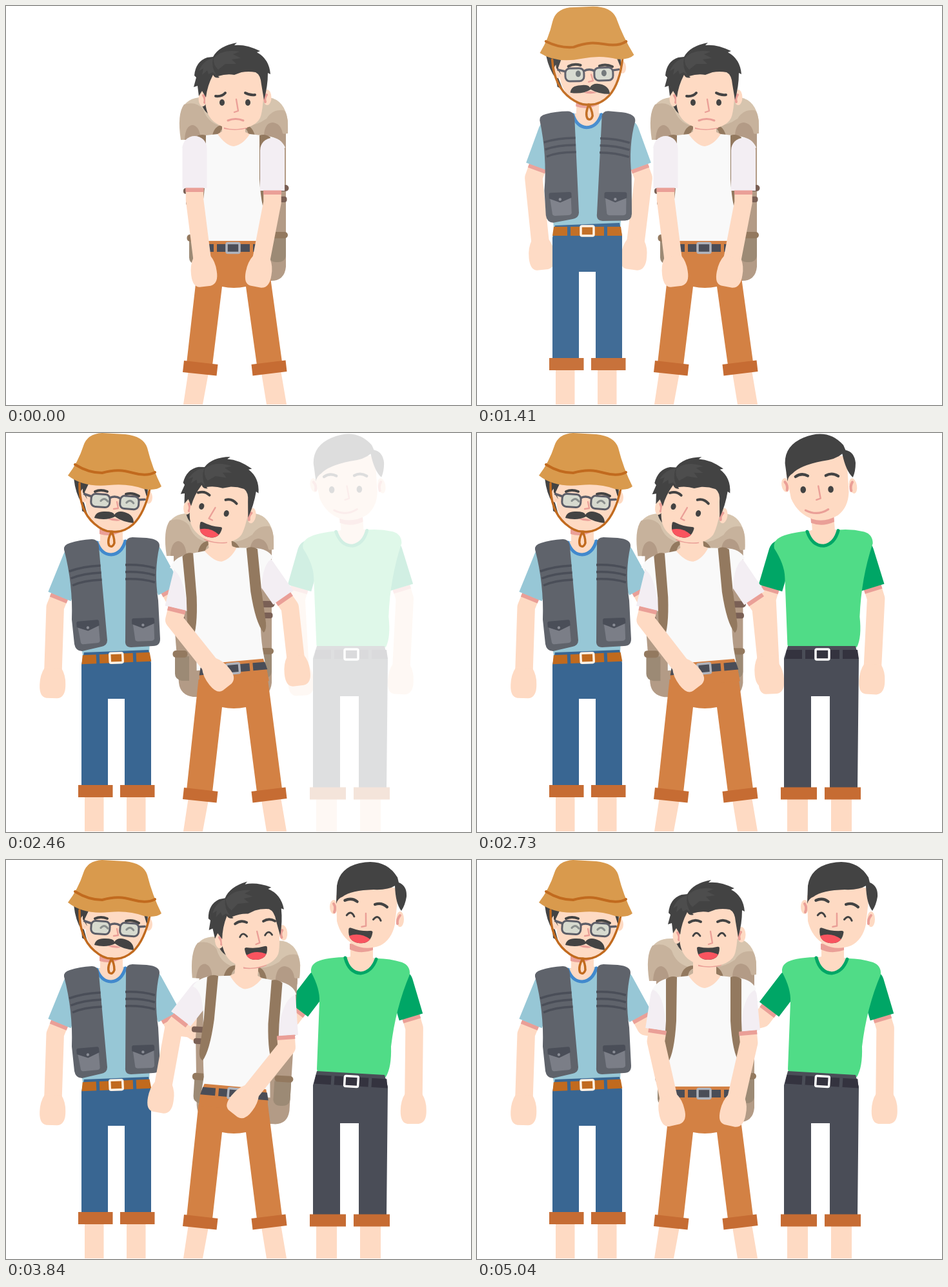
An HTML page with a canvas for the animation above (6 s loop, 721 by 620 pixels).

```html
<!DOCTYPE html>
<html lang="en">
<head>
<meta charset="utf-8">
<title>Three friends</title>
<style>
html, body { margin: 0; width: 100%; height: 100%; overflow: hidden; background: #fff; }
canvas { position: absolute; left: 0; top: 0; }
</style>
</head>
<body>
<canvas id="dad" width="721" height="620"></canvas>
<canvas id="friend" width="721" height="620"></canvas>
<canvas id="boy" width="721" height="620"></canvas>
<script>
const LOOP = 6000, STEP = 30;
const SKIN = '#fedac3', PINK = '#ea9f97', DARK = '#434343', CUFF = '#c66c33';
const layers = ['dad', 'friend', 'boy'].map(id => document.getElementById(id));
let g;

// Drawing helpers
const shape = (color, d) => { g.fillStyle = color; g.fill(new Path2D(d)); };
const line = (color, width, d) => {
  g.strokeStyle = color; g.lineWidth = width;
  g.stroke(new Path2D(d));
};
const box = (color, x, y, w, h, r = 0) => {
  g.fillStyle = color; g.beginPath(); g.roundRect(x, y, w, h, r); g.fill();
};
const frame = (color, width, x, y, w, h, r, inside) => {
  box(inside, x, y, w, h, r);
  g.strokeStyle = color; g.lineWidth = width; g.stroke();
};
const oval = (color, x, y, rx, ry) => {
  g.fillStyle = color; g.beginPath(); g.ellipse(x, y, rx, ry, 0, 0, 7); g.fill();
};
const within = (x, y, deg, paint) => {
  g.save(); g.translate(x, y); g.rotate(deg * Math.PI / 180); paint(); g.restore();
};
const turn = (px, py, deg, dx, dy, paint) =>
  within(px + dx, py + dy, deg, () => { g.translate(-px, -py); paint(); });

// Motion helpers
const clamp = k => Math.min(1, Math.max(0, k));
const ease = (t, from, to) => { const k = clamp((t - from) / (to - from)); return k * k * (3 - 2 * k); };
const mix = (a, b, k) => a.map((v, i) => v + (b[i] - v) * k);
const fadeIn = (t, start) => t < start ? 0 : clamp((t - start + 48) / 270);

// An arm is [shoulder x, y, sleeve hem x, y, wrist x, y]
const angle = (dx, dy) => -Math.atan2(dx, dy) * 180 / Math.PI;

function sleeve([sx, sy, ex, ey], color) {
  const dx = ex - sx, dy = ey - sy;
  within(sx, sy, angle(dx, dy), () =>
    shape(color, `M-19,0A19,19 0 0 1 19,0V${Math.hypot(dx, dy)}H-19Z`));
}

function forearm([sx, sy, ex, ey, wx, wy]) {
  const dx = ex - sx, dy = ey - sy, bend = 18 / Math.hypot(dx, dy);
  const kx = ex + dx * bend, ky = ey + dy * bend;
  g.lineCap = 'butt';
  line(SKIN, 27.5, `M${ex},${ey}L${kx},${ky}L${wx},${wy}`);
  g.lineCap = 'round';
  within(wx, wy, angle(wx - kx, wy - ky), () =>
    shape(SKIN, 'M-13,-3H13Q20,8 20,22Q21,42 8,44H-9Q-20,43 -20,24Q-20,8 -13,-3Z'));
  within(ex, ey, angle(dx, dy), () => box(PINK, -14, -.5, 28, 6.5));
}

// Face parts around the point between the eyes
function features(x, y, deg, mood, size = 1) {
  within(x, y, deg, () => {
    g.scale(size, size);
    const brows = mood === 'sad'
      ? 'M-30,-10Q-20,-9 -15,-15M16,-15Q23,-11 31,-12'
      : 'M-31,-19Q-22,-25 -13,-20M13,-20Q22,-25 31,-19';
    line(DARK, 4, brows);
    if (mood === 'laugh') {
      line(DARK, 2.8, 'M-25,2Q-20,-7 -14,2M14,2Q20,-7 25,2');
    } else {
      oval(DARK, -20, 0, 4, 5);
      oval(DARK, 20, 0, 4, 5);
    }
    line(PINK, 2.3, mood === 'cheer' ? 'M1,-4L-4,15L2,16' : 'M2,-5L5,13L-1,15');
    if (mood === 'sad') return line(PINK, 3, 'M-11,28Q1,23 13,28');
    if (mood === 'smile') return line(PINK, 3, 'M-17,30Q0,39 16,29');
    if (mood === 'cheer') g.translate(4, 4);
    shape(DARK, 'M-19,21Q-19,19 -16,19Q-1,22 12,19Q16,18 16,21Q16,39 -2,39Q-18,39 -19,21Z');
    shape('#f9545f', 'M-17,31Q-2,23 14,31Q10,39 -2,39Q-13,39 -17,31Z');
  });
}

function pocket(x, y, deg) {
  within(x, y, deg, () => {
    shape('#7b7e87', 'M1,4H34L34,33Q33,36 29,36H8Q4,36 4,32Z');
    shape('#4a4e58', 'M0,3Q0,0 3,0H32Q35,0 35,3V9L17,16L0,9Z');
    oval('#8a8d96', 17, 11, 2.2, 2.2);
  });
}

function legs(x1, x2, y, width) {
  for (const x of [x1, x2]) {
    box(SKIN, x + 10, y + 15, width - 24, 620 - y);
    box(CUFF, x, y, width, 19);
  }
}

const dadArms = {
  left: [[114, 195, 94, 250, 98, 366], [107, 195, 83, 254, 73, 368]],
  right: [[232, 195, 252, 250, 246, 366], [224, 190, 253, 243, 285, 262]]
};

function drawDad(t) {
  const k = ease(t, 1440, 1770);
  const blue = '#97c7d6', pants = '#396692', brown = '#c16a1e', vest = '#5f636b';
  for (const side of [dadArms.left, dadArms.right]) {
    const arm = mix(...side, k);
    forearm(arm);
    sleeve(arm, blue);
  }
  turn(172, 345, 2.5 * (1 - k), 0, 0, () => {
    shape(blue, 'M120,172L145,168L185,166L228,172L222,345L119,348L108,240Z');
    shape(SKIN, 'M146,140H181V166L184,168Q178,188 163,188Q148,188 141,170L146,168Z');
    shape(PINK, 'M145,149H181V152Q164,163 145,157Z');
    line('#4189cd', 5, 'M141,170Q148,189 163,189Q179,188 185,168');
  });
  shape(pants, 'M121,341L117,360V548H158V413H184V548H225V357L221,337Z');
  legs(112, 177, 547, 53.5);
  turn(171, 350, 2.5 * (1 - k) - 2.5, 0, 0, () => {
    shape(brown, 'M119,343H223L225,357H117Z');
    box(pants, 140, 342, 5, 16);
    box(pants, 197, 342, 5, 16);
    frame('#fff3e6', 3.5, 161, 342, 20, 15, 2, brown);
  });
  turn(172, 345, 2.5 * (1 - k), 0, 0, () => {
    shape(vest, 'M90,181Q89,174 99,171Q114,166 133,165Q143,165 144,177L157,322Q157,330 148,332L118,339Q108,339 106,328L102,290Q104,235 90,181Z');
    shape(vest, 'M186,172Q186,162 196,162L218,163Q239,165 238,176Q229,215 236,260L239,320Q239,331 228,331L194,333Q184,333 185,322Z');
    g.lineCap = 'butt';
    for (const [i, y] of [0, 11, 22].entries()) {
      line('#4a4e58', 3.5, `M${98 + i * 2.5},${215 + y}Q120,${207 + y} ${146.5 + i},${206 + y}`);
      line('#4a4e58', 3.5, `M185,${205 + y}Q210,${204 + y} 231,${210 + y}`);
    }
    g.lineCap = 'round';
    pocket(109, 293, -5);
    pocket(195, 288, -2);
  });
  turn(168, 75, -5.5 * (1 - k), 2 * (1 - k), 0, () => drawDadHead(t < 1590));
}

function drawDadHead(awake) {
  const brown = '#c16a1e', frameColor = '#5c5d67';
  shape(DARK, 'M105,70L122,76L120,105L126,126L118,121L117,108Q108,95 105,70Z');
  oval(SKIN, 221, 100, 6, 10);
  oval(SKIN, 121, 97, 6, 11);
  line(PINK, 3, 'M122,91Q126,98 124,104');
  shape(SKIN, 'M120,72L124,115Q132,149 166,153Q203,151 213,118L219,82Z');
  shape(DARK, 'M119,75L129,77L122,92L126,103L119,92ZM213,82L220,85L219,102Z');
  line(DARK, 4, 'M138,91Q147,87 157,91M186,95Q196,92 206,98');
  within(168, 105, 4, () => {
    frame(frameColor, 3, -36, -8.5, 29, 20, 7, '#d7dacf');
    frame(frameColor, 3, 9, -8.5, 29, 20, 7, '#d7dacf');
    line(frameColor, 3.5, 'M-7,-4Q1,-8 9,-4M-36,-4L-47,-7M38,-4L47,-5');
    if (awake) {
      oval('#6e7577', -16, 0, 4, 5);
      oval('#6e7577', 24, 0, 4, 5);
    } else {
      line('#8b908e', 3, 'M-21,2Q-16,-5 -10,2M19,2Q24,-5 30,2');
    }
  });
  line(PINK, 2.3, 'M172,107L174,117L167,118');
  shape(PINK, 'M158,134Q168,130 178,136Q168,138 158,134Z');
  shape(DARK, 'M137,132Q139,121 154,122Q167,122 168,127Q173,120 184,123Q198,127 198,140Q180,138 169,130Q155,137 137,132Z');
  line(brown, 3.5, 'M114,78Q113,120 137,141Q152,154 164,153Q181,156 197,142Q215,125 223,86M164,153Q156,167 160,175Q165,179 168,171Q168,160 163,153');
  shape('#d99a4d', 'M96,66Q112,45 120,20Q126,1 149,0L185,2Q213,5 219,23Q227,55 241,83Q233,90 214,87Q190,78 160,81Q120,85 96,66Z');
  line(brown, 4, 'M107,49Q128,62 149,62C170,56 182,58 197,62Q218,68 231,61');
}

const friendArms = {
  left: [[471, 185, 455, 241, 456, 364], [485, 190, 453, 232, 412, 254]],
  right: [[596, 185, 613, 240, 613, 362], [612, 190, 628, 244, 632, 366]]
};

function drawFriend(t) {
  const k = ease(t, 2700, 3030);
  const green = '#50dc87', deep = '#00a666', pants = '#4a4d57', belt = '#34333f';
  for (const side of [friendArms.left, friendArms.right]) {
    const arm = mix(...side, k);
    forearm(arm);
    sleeve(arm, deep);
  }
  turn(535, 335, -4.5 * (1 - k), 0, 0, () => {
    shape(green, 'M524,151Q490,152 479,160Q472,165 473,174Q487,200 486,220L482,325L484,334L589,337Q598,322 597,290Q604,230 626,178Q627,164 614,159Q595,153 576,153Z');
    shape(SKIN, 'M534,120H569V152L574,154Q566,175 550,176Q533,175 527,152L534,150Z');
    shape(PINK, 'M533,130L569,133V140Q550,147 533,139Z');
    line(deep, 5, 'M526,152Q532,175 550,176Q567,174 574,154');
  });
  shape(pants, `M482,${331 - 3 * k}L476,350V551H518V409H547V551H590L592,352L587,${331 + 3 * k}Z`);
  legs(471, 539, 550.5, 56);
  within(535, 344, 3.5 * k, () => {
    shape(belt, 'M-55,-7H55L57,7H-57Z');
    box(pants, -31, -8, 5, 16);
    box(pants, 27, -8, 5, 16);
    frame('#fff', 3.5, -10, -8, 21, 16, 2, belt);
  });
  turn(554, 85, -10 * (1 - k), -29 * (1 - k), 0, () => {
    oval(SKIN, 508, 73, 6, 11);
    oval(SKIN, 611, 92, 6, 12);
    line(PINK, 4, 'M508,68Q512,74 509,81M611,86Q606,92 607,99');
    shape(SKIN, 'M512,55L513,95Q519,120 540,132Q558,141 580,133Q598,124 603,100L609,45L570,35Z');
    shape(DARK, 'M512,68L513,40Q517,12 548,5Q588,-4 607,27L609,35Q622,40 621,57Q619,70 613,79Q604,68 603,40Q592,47 570,46Q535,47 522,57Q514,60 512,68Z');
    features(555, 88, 9, t < 2850 ? 'smile' : 'laugh', 1.07);
  });
}

// Each body part is [x, y, tilt]; pack, torso and hip are offsets
const sad = {
  pack: [0, 0, 0], torso: [0, 19, 0], hip: [0, 13, 0], head: [355, 190, 0], face: [355, 150, 0],
  left: [292.5, 221, 292.5, 283, 304, 392], right: [413, 224, 413, 287, 396, 393]
};
const glance = {
  pack: [0, 0, 0], torso: [0, 18, -1], hip: [0, 12, -1.5], head: [350, 189, 10], face: [347.5, 135, 11],
  left: [283, 224, 271, 283, 252, 394], right: [408, 222, 419, 282, 415, 388]
};
const cheer = {
  pack: [-22, -17, 0], torso: [-3, 0, -5.5], hip: [0, 3, -5], head: [324, 168, 9], face: [322.5, 119.5, 16],
  left: [280, 212, 265, 273, 316, 360], right: [398, 210, 430, 256, 449, 349]
};
const smile = {
  pack: [-15, -15, 0], torso: [0, 4, -2.2], hip: [1, 3, -1.5], head: [342, 172, 5], face: [343.5, 122, 8.7],
  left: [284, 214, 271, 272, 303, 367], right: [408, 210, 431, 266, 435, 361]
};
const laugh = {
  pack: [12, -20, 3.5], torso: [5, 1, 4.5], hip: [2.5, 0, 5], head: [385, 166, -6], face: [387.5, 116, -4],
  left: [303, 206, 271, 247, 244, 349], right: [430, 212, 434, 273, 380, 360]
};
const rest = {
  pack: [-4, -20, 0], torso: [0, 0, 0], hip: [0, 0, 0], head: [360, 164, 0], face: [360, 116, 0],
  left: [288, 212, 280, 264, 297, 369], right: [415, 212, 420, 266, 402, 370]
};
const poses = [
  [0, sad], [1440, sad], [1800, glance], [1950, glance], [2430, cheer], [2670, cheer],
  [3060, smile], [3150, smile], [3690, laugh], [4800, laugh], [5040, rest], [LOOP, rest]
];

function boyPose(t) {
  const next = poses.findIndex(([time]) => time > t);
  const [from, a] = poses[next - 1], [to, b] = poses[next];
  const k = ease(t, from, to), pose = {};
  for (const part in a) pose[part] = mix(a[part], b[part], k);
  return pose;
}

const boyMood = t => t < 2130 ? 'sad' : t < 2790 ? 'cheer' : t < 3360 ? 'smile' : 'laugh';

function drawPack() {
  const strap = '#93795f', roll = '#7a6055', side = '#9c8a75', mid = '#c7b29c', main = '#b39b86';
  shape(main, 'M282,185H434V405Q432,427 411,427H312Q292,424 290,405L282,300Z');
  shape('#d6c4ae', 'M272,162Q280,142 304,142H408Q432,146 437,178V195H300Z');
  shape(mid, 'M271,208Q265,168 276,153Q295,147 306,161Q312,180 331,186V207Z');
  shape(mid, 'M437,198Q438,168 431,162Q413,160 404,175Q388,186 374,186V207Z');
  shape(main, 'M277,208Q278,185 290,185Q301,188 302,208ZM400,208Q399,182 413,181Q426,182 429,198L434,200V208Z');
  shape(side, 'M284,364H306V402H295Q284,400 284,391ZM434,360V388Q433,398 421,398Q410,399 408,390V360Z');
  box(strap, 280.5, 355, 23, 11, 5);
  box(strap, 408, 351, 29, 10, 5);
  box(roll, 275, 283, 24, 9, 4);
  box(roll, 279, 301, 20, 9, 4);
  box(roll, 414, 278, 24.5, 10, 5);
  box(roll, 416, 296, 19.5, 9, 4);
  shape(strap, 'M319,207Q321,184 340,184H368Q384,185 387,207Z');
  shape(mid, 'M330,207Q331,188 343,188H366Q376,189 377,207Z');
}

function drawPants([x, drop, tilt]) {
  const orange = '#d38144', belt = '#4a4d57';
  shape(SKIN, 'M283,566L314,570L305,619H275ZM396,570L426,566L435,619H404Z');
  shape(orange, `M298.5,${380 + drop}L280,555L320,558L335,${423 + drop}Q353,${427 + drop} 372,${423 + drop}L389,558L428,553L406,${380 + drop}Z`);
  turn(352, 363, tilt, x, drop, () => {
    shape(orange, 'M304,352H400L404,368L406,387H298L299,368Z');
    shape(belt, 'M302,357H322V369H299ZM327,357H378V369H327ZM383,357H402L405,369H383Z');
    frame('#b0b4bd', 3.5, 342, 355.5, 20, 15, 2, belt);
  });
  shape(CUFF, 'M276,551L328.5,557L326.5,574.5L274,569ZM380.5,557L433.5,550.5L435.5,568L382.5,574.5Z');
}

function drawShirt() {
  const strap = '#93795f';
  shape('#f9f9f9', 'M328,180L300,183Q280,186 272,201Q289,207 292,250Q296,310 300,340L298,364H405L403,340Q401,300 410,250Q415,207 433,201Q427,186 405,183L378,180Z');
  shape(SKIN, 'M335,150V176L328,180Q341,198 353,199Q367,197 378,180L371,177V150Z');
  shape(strap, 'M293,185Q301,179 310,182L309,250Q306,300 296,315Q290,312 290,300L293,250Z');
  shape(strap, 'M410,185Q402,179 393,182L393,250Q396,300 407,315Q412,312 412,300L410,250Z');
}

function drawBoyHead() {
  shape(DARK, 'M300,138H318L313,167Q303,160 300,138Z');
  oval(SKIN, 305, 144, 6.5, 12);
  oval(SKIN, 405, 142, 6.5, 12);
  line(PINK, 4, 'M306,139Q310,145 308,150M404,138Q400,143 402,149');
  shape(PINK, 'M338,186H374V190Q358,195 338,191Z');
  shape(SKIN, 'M309,105V150Q311,172 324,181Q340,193 360,191Q386,189 394,174Q400,160 400,105L360,90Z');
  shape(DARK, 'M299,140L297,124L291,126L295,111L292,108Q294,86 312,80L321,79Q330,62 358,57L354,61Q372,59 394,70L389,72Q408,82 410,106L406,104Q406,125 400,146L396,122Q395,107 387,103Q376,101 365,103L354,107Q342,105 329,109L331,111Q324,113 321,107Q312,124 310,142L304,132Z');
  shape('#4d4d4d', 'M321,81Q318,95 326,107L320,103L314,106L312,100L304,107L306,97L299,101Q306,84 321,81ZM322,81Q336,66 362,71L352,75L364,81L350,83L357,90L340,90L329,99Q321,92 322,81Z');
}

function drawBoy(t) {
  const pose = boyPose(t), white = '#f3eef3';
  const slumped = t < 2190;
  const bob = 1.5 * Math.sin(Math.PI * clamp((t - 4080) / 390)) ** 2;
  const sleeves = () => { sleeve(pose.left, white); sleeve(pose.right, white); };
  const [px, py, pr] = pose.pack, [tx, ty, tr] = pose.torso;
  const [hx, hy, hr] = pose.head, [fx, fy, fr] = pose.face;
  turn(352, 300, pr, px, py, drawPack);
  if (!slumped) sleeves();
  turn(352, 360, tr, tx, ty, drawShirt);
  drawPants(pose.hip);
  if (slumped) sleeves();
  turn(355, 190, hr, hx - 355, hy - 190 + bob, drawBoyHead);
  features(fx, fy + bob, fr, boyMood(t));
  forearm(pose.left);
  forearm(pose.right);
}

function paint(layer, opacity, draw, t) {
  layer.style.opacity = opacity;
  g = layer.getContext('2d');
  g.clearRect(0, 0, 721, 620);
  g.lineCap = g.lineJoin = 'round';
  g.save();
  // The ground line cuts off the legs
  g.beginPath(); g.rect(0, 0, 721, 619); g.clip();
  if (opacity) draw(t);
  g.restore();
}

const start = performance.now();
function tick() {
  const t = Math.floor((performance.now() - start) % LOOP / STEP) * STEP;
  paint(layers[0], fadeIn(t, 1200), drawDad, t);
  paint(layers[1], fadeIn(t, 2460), drawFriend, t);
  paint(layers[2], 1, drawBoy, t);
  requestAnimationFrame(tick);
}
tick();
</script>
</body>
</html>
```
